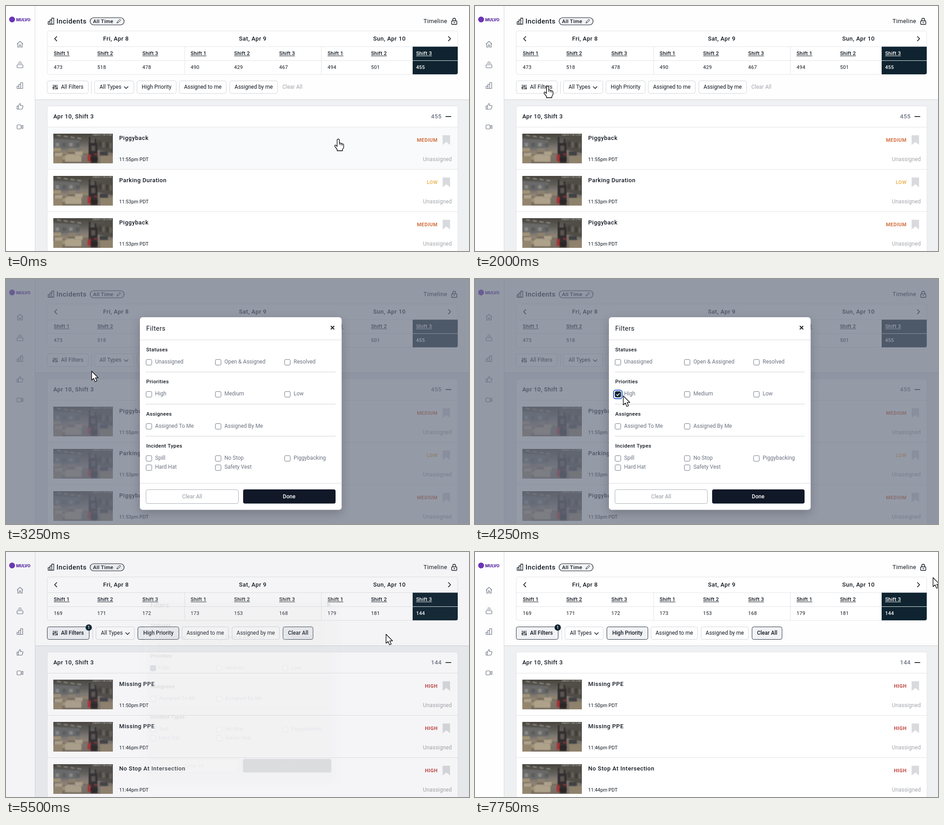
An HTML page with a canvas for the animation above (8000 ms loop, 1027 px wide and 545 px high).

```html
<!DOCTYPE html>
<html lang="en">
<head>
<meta charset="utf-8">
<title>Incidents</title>
<style>
html, body { margin: 0; width: 100%; height: 100%; overflow: hidden; background: #fefefe; }
canvas { display: block; }
</style>
</head>
<body>
<canvas id="stage" width="1027" height="545"></canvas>
<script>
const stage = document.getElementById('stage').getContext('2d');
let ctx = stage;
const LOOP = 8000, STEP = 250;
const INK = '#111820', NAVY = '#0f2430', GREY = '#6b7280', PALE = '#a3a5aa', LINE = '#e3e4e8';

const before = {
  counts: [473, 518, 478, 490, 429, 467, 494, 501, 455],
  rows: [['Piggyback', '11:55pm', 'MEDIUM'], ['Parking Duration', '11:53pm', 'LOW'], ['Piggyback', '11:53pm', 'MEDIUM']],
  buttons: [[92, 91], [197, 87], [291, 87], [385, 104], [497, 106]],
  divider: 189.5
};
const after = {
  counts: [169, 171, 172, 173, 153, 168, 179, 181, 144],
  rows: [['Missing PPE', '11:50pm', 'HIGH'], ['Missing PPE', '11:46pm', 'HIGH'], ['No Stop At Intersection', '11:44pm', 'HIGH']],
  buttons: [[92, 93], [200, 85], [293, 91], [391, 103], [502, 105]],
  divider: 192.5
};
const levels = { LOW: '#efb65c', MEDIUM: '#d2703f', HIGH: '#c0453f' };

// time, x, y, hand pointer
const path = [
  [0, 737, 296, 1], [500, 748, 345, 1], [1000, 780, 215, 0], [1250, 743, 178, 0],
  [1500, 540, 174, 1], [2000, 161, 178, 1], [2400, 161, 178, 1], [2500, 154, 178, 0],
  [3000, 154, 178, 0], [3250, 190, 205, 0], [3750, 492, 335, 0], [4000, 345, 270, 0],
  [4250, 329, 260, 0], [4500, 329, 260, 0], [5000, 628, 480, 1], [5250, 644, 447, 1],
  [5500, 843, 183, 0], [6750, 905, 170, 0], [7750, 1016, 57, 0]
];

const clamp = v => Math.max(0, Math.min(1, v));

function text(s, x, y, size, weight = 400, color = INK, align = 'left', gap = 0) {
  ctx.font = `${weight} ${size}px Roboto, Inter, sans-serif`;
  ctx.letterSpacing = gap + 'px';
  ctx.textAlign = align;
  ctx.fillStyle = color;
  ctx.fillText(s, x, y);
  return ctx.measureText(s).width;
}
const bold = (s, x, y, color, align) => text(s, x, y, 13, 500, color, align, 0.5);

function rect(x, y, w, h, color) {
  ctx.fillStyle = color;
  ctx.fillRect(x, y, w, h);
}

function box(x, y, w, h, r, fill, stroke, width = 1) {
  ctx.beginPath();
  ctx.roundRect(x, y, w, h, r);
  if (fill) { ctx.fillStyle = fill; ctx.fill(); }
  if (stroke) { ctx.strokeStyle = stroke; ctx.lineWidth = width; ctx.stroke(); }
}

function disc(x, y, r, color) {
  ctx.beginPath();
  ctx.arc(x, y, r, 0, 7);
  ctx.fillStyle = color;
  ctx.fill();
}

function shape(d, stroke, width = 1.2, fill) {
  const p = new Path2D(d);
  if (fill) { ctx.fillStyle = fill; ctx.fill(p); }
  if (stroke) { ctx.strokeStyle = stroke; ctx.lineWidth = width; ctx.stroke(p); }
}

function sidebar() {
  rect(64, 0, 1, 545, '#d5d7dc');
  disc(13.5, 30, 6.5, '#6a35b5');
  text('MULVO', 22.5, 34, 9.5, 900, '#5a2ca5');
  shape('M24.5 84.5l6.500-6 6.500 6M26 83.500v8h3.500v-5h3v5H36v-8', GREY);
  box(24.5, 130.5, 13, 7, 1.5, null, GREY, 1.2);
  shape('M26 127.500h10M28 124.500h6', GREY);
  shape('M24.500 178.500h4v5h-4zM28.500 174.500h4v9h-4zM32.500 170.500h4.500v13h-4.500z', GREY);
  shape('M24.500 222.500h3v7h-3zM27.500 223l3-6c2.500 0 2.500 2 1.500 4.500h4.500q1.500 0 1 2l-1.500 5q-.500 1-2 1h-6.500', GREY);
  box(24.5, 264.5, 9, 9, 1.5, null, GREY, 1.2);
  shape('M33.500 268l4-2.500v7l-4-2.500', GREY);
}

function heading() {
  shape('M93.500 35h4v5.500h-4zM97.500 31h4v9.500h-4zM101.500 27h4.500v13.500h-4.500z', INK, 1.3);
  text('Incidents', 112, 39, 15, 500, INK, 'left', 0.55);
  box(186.5, 26, 75.5, 16, 8, '#f1f3f5', INK, 1.2);
  text('All Time', 193, 38, 11.5, 500, INK, 'left', 0.3);
  shape('M246 38l1-3 5.500-5.500 2 2-5.500 5.500z', INK, 1);
  text('Timeline', 926, 38, 13, 400, INK, 'left', 0.4);
  shape('M991 33v-2.500a3.200 3.200 0 0 1 6.400 0V33', INK, 1.4);
  box(988.5, 33, 11.5, 8, 1.5, null, INK, 1.4);
  disc(994.2, 37, 1.2, INK);
}

function table(counts) {
  box(91.5, 55.5, 910.5, 96.5, 4, '#fff', LINE);
  rect(92, 90, 910, 1, LINE);
  rect(92, 121, 910, 1, LINE);
  rect(396, 90, 1, 62, LINE);
  rect(699, 90, 1, 62, LINE);
  box(902, 90.5, 100, 61.5, [0, 0, 4, 0], NAVY);
  rect(902, 121, 100, 1, '#dfe4e7');
  shape('M113 67.500l-5 5.300 5 5.300M981 67.500l5 5.300-5 5.300', INK, 1.6);
  ['Fri, Apr 8', 'Sat, Apr 9', 'Sun, Apr 10'].forEach((day, i) => bold(day, 244 + i * 303.3, 77, INK, 'center'));
  counts.forEach((n, i) => {
    const x = [106, 202.5, 302.5][i % 3] + Math.floor(i / 3) * 303.6;
    const color = i === 8 ? '#fff' : INK;
    const w = text('Shift ' + (i % 3 + 1), x, 109, 11.5, 500, color, 'left', 0.2);
    rect(x, 110.5, w, 1, color);
    text(n, x, 140, 11, i === 8 ? 500 : 400, color, 'left', 0.3);
  });
}

function filters(view, filtered) {
  const names = ['All Filters', 'All Types', 'High Priority', 'Assigned to me', 'Assigned by me'];
  view.buttons.forEach(([x, w], i) => {
    const on = filtered && (i === 0 || i === 2);
    box(x - 0.5, 166.5, w, 28, 4, on ? '#f1f2f5' : '#fff', on ? '#26343f' : '#d3d5da');
    const weight = on ? 500 : 400;
    if (i === 0) text(names[i], x + 30, 184, 12, weight);
    else if (i === 1) text(names[i], x + 10.5, 184, 12);
    else text(names[i], x + w / 2 - 0.5, 184, 12, weight, INK, 'center');
  });
  shape('M105 175v11M109 175v11M113 175v11', INK, 1.3);
  shape('M103.300 182h3.400M107.300 178.500h3.400M111.300 183h3.400', INK, 2);
  shape(`M${view.buttons[1][0] + 65} 179l4.500 4.500 4.500-4.500`, INK, 1.5);
  rect(view.divider - 0.5, 167, 1, 28, '#d3d5da');
  if (filtered) {
    box(614.5, 166.5, 66.5, 28, 4, '#f1f2f5', '#26343f');
    text('Clear All', 648, 184, 12, 500, INK, 'center');
    disc(183.5, 168, 7, NAVY);
    text('1', 183.5, 171, 8.5, 500, '#fff', 'center');
  } else {
    text('Clear All', 613, 184, 12, 400, PALE);
  }
}

// Soft warehouse picture, painted once
function makePhoto() {
  const canvas = document.createElement('canvas');
  canvas.width = 132;
  canvas.height = 66;
  ctx = canvas.getContext('2d');
  const g = ctx.createLinearGradient(0, 0, 0, 66);
  g.addColorStop(0, '#47443d');
  g.addColorStop(0.3, '#605e58');
  g.addColorStop(0.5, '#817b74');
  g.addColorStop(1, '#766d62');
  rect(0, 0, 132, 66, g);
  ctx.filter = 'blur(0.8px)';
  shape('M-2 11L58 15V32L-2 36z', null, 0, '#696a69');
  shape('M134 8L94 14V36L134 44z', null, 0, '#504d47');
  for (let i = 0; i < 4; i++) {
    shape(`M${8 + i * 15} ${4 + i * 2}l9 1.500`, '#b5b6ae', 1.3);
    rect(5 + i * 15, 21, 8, 8, i % 2 ? '#5b5c5b' : '#8a8a86');
    rect(101 + i * 8, 18 + i, 5, 12, i % 2 ? '#68625a' : '#403d39');
  }
  for (let i = 0; i < 9; i++) {
    const x = i * 15 % 72, y = 32 + i * 7 % 24;
    rect(x, y, 17, 11, ['#a09378', '#8d8170', '#ada18b'][i % 3]);
    rect(x, y + 9, 17, 2, '#6b6051');
  }
  rect(26, 48, 36, 15, '#aea28b');
  rect(-2, 51, 22, 17, '#94866e');
  rect(104, 49, 30, 19, '#8f826c');
  rect(103, 40, 18, 9, '#414143');
  shape('M79 8h3v44h-3zM92 12h3v38h-3z', null, 0, '#2c2a2b');
  rect(79, 21, 19, 38, '#322e2f');
  rect(84, 27, 9, 12, '#5a5550');
  shape('M76 48l7-2v18l-7-3z', null, 0, '#a83434');
  rect(83, 54, 15, 11, '#2b2526');
  rect(90, 45, 8, 3, '#8f3636');
  ctx.filter = 'none';
  text('CAM 04 11:50:12 PM', 130, 5, 4.5, 500, '#b5b5b0', 'right');
  ctx = stage;
  return canvas;
}
const photo = makePhoto();

function list(view, hover) {
  rect(65, 208, 962, 337, '#eff0f2');
  rect(65, 208, 962, 1, '#cdd0d5');
  box(91.5, 222.5, 911, 340, 5, '#fff', LINE);
  bold('Apr 10, Shift 3', 105, 250);
  bold(view.counts[8], 966.5, 250, GREY, 'right');
  rect(975, 245, 12.5, 1.7, INK);
  view.rows.forEach(([title, time, level], i) => {
    const y = 269 + i * 94;
    if (i === hover) rect(92, y, 910, 94, '#f9fafb');
    rect(92, y, 910, 1, LINE);
    ctx.drawImage(photo, 105, y + 14.5);
    bold(title, 251, y + 29);
    text(time + ' PDT', 251, y + 76, 10.8);
    text(level, 957.5, y + 33, 11, 700, levels[level], 'right', 0.5);
    shape(`M968.500 ${y + 18.5}h16.500v21.500l-8.250-6.500-8.250 6.500z`, null, 0, '#d9dadd');
    text('Unassigned', 989, y + 76, 12, 400, PALE, 'right', 0.15);
  });
}

function checkbox(x, y, label, checked, ring) {
  if (ring) box(x - 3, y - 9, 19, 19, 4.5, '#fff', '#2f62c9', 2);
  box(x + 0.5, y - 6, 12.5, 12.5, 2.5, checked ? NAVY : '#fff', checked ? NAVY : GREY);
  if (checked) shape(`M${x + 3.5} ${y + 0.5}l2.500 2.500 4.500-5`, '#fff', 1.7);
  text(label, x + 20.5, y + 3, 12, 400, GREY);
}

function dialog(shown, checked, ring) {
  rect(0, 0, 1027, 545, `rgba(104,111,130,${0.7 * shown})`);
  const scale = 0.95 + 0.05 * shown;
  ctx.save();
  ctx.globalAlpha = shown;
  ctx.translate(520.5, 299);
  ctx.scale(scale, scale);
  ctx.translate(-520.5, -299);
  ctx.shadowColor = 'rgba(0,0,0,0.2)';
  ctx.shadowBlur = 22;
  ctx.shadowOffsetY = 8;
  box(297, 85, 447.5, 428.5, 6, '#fff');
  ctx.shadowColor = 'transparent';
  text('Filters', 311, 115, 14.5, 400, INK, 'left', 0.45);
  shape('M720.500 104.500l7.500 7.500M728 104.500l-7.500 7.500', INK, 2);
  rect(297, 135, 447.5, 1, '#d9dbe0');
  rect(297, 454, 447.5, 1, '#d9dbe0');
  const groups = [
    ['Statuses', 'Unassigned', 'Open & Assigned', 'Resolved'],
    ['Priorities', 'High', 'Medium', 'Low'],
    ['Assignees', 'Assigned To Me', 'Assigned By Me'],
    ['Incident Types', 'Spill', 'No Stop', 'Piggybacking', 'Hard Hat', 'Safety Vest']
  ];
  groups.forEach(([title, ...labels], g) => {
    const y = 185 + g * 71.3;
    text(title, 311, y - 24, 11.5, 500, INK, 'left', 0.35);
    if (g < 3) rect(310, y + 21.5, 421, 1, '#cfd2d7');
    labels.forEach((label, i) => {
      const high = label === 'High';
      checkbox(310.3 + i % 3 * 153.6, y + (i > 2 ? 20.5 : 0), label, high && checked, high && ring);
    });
  });
  box(310.5, 468.5, 205, 31, 4, '#fff', '#a9adb5');
  text('Clear All', 413, 488, 12, 400, '#9297a1', 'center');
  box(526, 468, 205, 31.5, 4, '#111827');
  text('Done', 628, 488, 12, 500, '#fff', 'center');
  ctx.restore();
}

function pointerAt(t) {
  const i = path.findLastIndex(k => k[0] <= t);
  const a = path[i], b = path[i + 1] || a;
  const u = b === a ? 0 : (t - a[0]) / (b[0] - a[0]);
  return { x: a[1] + (b[1] - a[1]) * u, y: a[2] + (b[2] - a[2]) * u, hand: a[3] };
}

function pointer({ x, y, hand }) {
  ctx.save();
  ctx.translate(x, y);
  ctx.lineJoin = 'round';
  if (hand) {
    shape('M-2.500 1.500Q0-1.500 2.500 1.500V9Q5 7.500 6 10 8.500 8.500 9 11 12 10 12 13.500V19L9.500 23v3H-2.500V23L-7.500 16.500Q-8.500 12.500-5.500 13.500L-2.500 16.500z', '#000', 1.3, '#fff');
    shape('M2.500 9v4M6 10v4M9 11.500v3', '#000', 1.1);
  } else {
    shape('M0 0V20L4.500 16 7.800 23.500 11.500 22 8.300 14.700H14.500z', '#000', 1.3, '#fff');
  }
  ctx.restore();
}

function draw(t) {
  // The list reloads first, the shift counts follow
  const filtered = t >= 4750, view = filtered ? after : before;
  const counts = (t >= 5500 ? after : before).counts;
  const enter = clamp((t - 2312) / 300), leave = clamp((t - 5310) / 200);
  const shown = (1 - (1 - enter) ** 2) * (1 - leave ** 2);
  const p = pointerAt(t);
  const hover = shown ? -1 : Math.floor((p.y - 269) / 94);
  rect(0, 0, 1027, 545, '#fefefe');
  sidebar();
  heading();
  table(counts);
  filters(view, filtered);
  list(view, hover);
  if (shown) dialog(shown, t >= 4250, t >= 4250 && !filtered);
  pointer(p);
}

// The picture holds for each step of the clock
function tick(now) {
  draw(Math.floor(now % LOOP / STEP) * STEP);
  requestAnimationFrame(tick);
}
requestAnimationFrame(tick);
</script>
</body>
</html>
```
